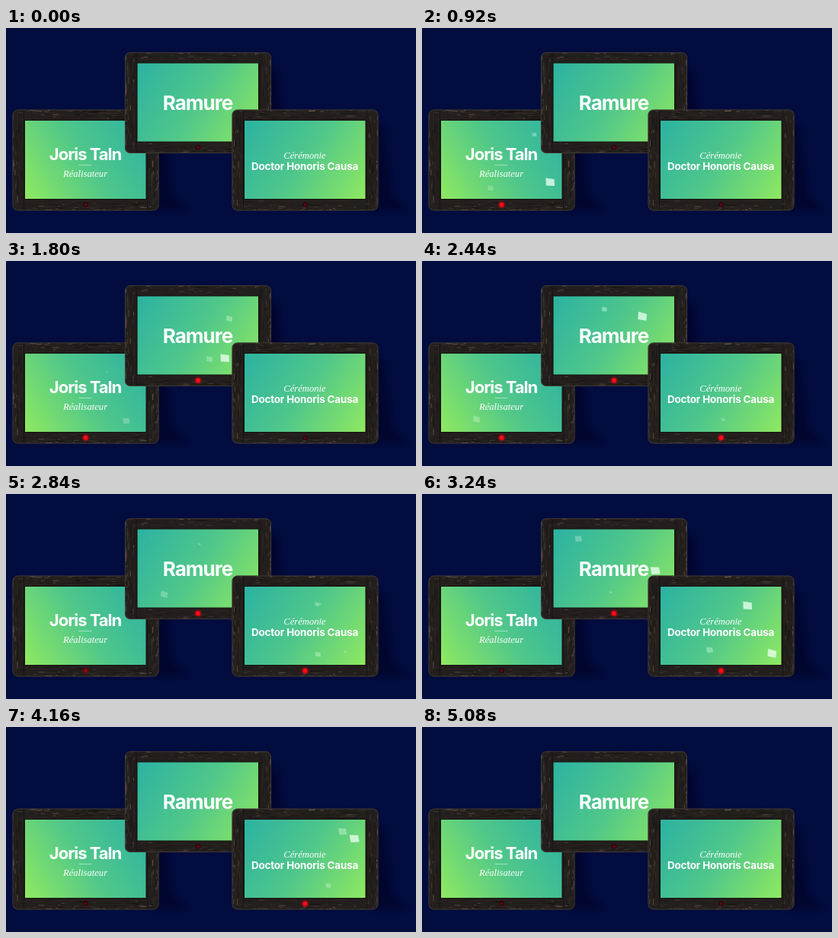
These frames come from a looping animation (538x270 px, 5360 ms). An HTML page:

```html
<!DOCTYPE html>
<html lang="fr">
<head>
<meta charset="utf-8">
<title>Trois écrans</title>
<style>
html, body { margin: 0; width: 100%; height: 100%; overflow: hidden; background: #020c3e; }
#stage { display: block; width: 538px; height: 270px; }
text { fill: #fff; text-anchor: middle; }
.bold { font-family: Inter, "Liberation Sans", sans-serif; font-weight: 700; }
.name { font-size: 22px; letter-spacing: -1px; }
.title { font-size: 26px; letter-spacing: -1px; }
.event { font-size: 13.4px; letter-spacing: -.15px; }
.italic { font-family: "Liberation Serif", serif; font-style: italic; font-size: 12.6px; }
</style>
</head>
<body>
<svg id="stage" viewBox="0 0 538 270"></svg>
<script>
const LOOP = 5360, RUN = 2800, FAINT = 7;
const BEFORE = 480, AFTER = 400;
const W = 192, H = 133;
const SCREEN = { x: 16, y: 14, width: 159.5, height: 104 };
const COLORS = ['#2bb2a2', '#50c78a', '#8fe960'];

// lines: class, baseline, words; leads: time and place of the bright scraps
const tablets = [
  {
    x: 8.5, y: 107.5, on: 80, flip: true, rule: 73,
    lines: [['bold name', 66, 'Joris Taln'], ['italic', 88.5, 'Réalisateur']],
    leads: [[920, 168, 203]]
  },
  {
    x: 156, y: 32, on: 1160,
    lines: [['bold title', 75.5, 'Ramure']],
    leads: [[1800, 287, 128], [2440, 289, 73], [3240, 306, 101]]
  },
  {
    x: 296.5, y: 107.5, on: 2240,
    lines: [['italic', 64, 'Cérémonie'], ['bold event', 79.5, 'Doctor Honoris Causa']],
    leads: [[3240, 427, 147], [3240, 459, 210], [4160, 457, 147]]
  }
];

function add(parent, tag, attrs, content) {
  const node = document.createElementNS('http://www.w3.org/2000/svg', tag);
  for (const key in attrs) node.setAttribute(key, attrs[key]);
  if (content) node.textContent = content;
  parent.appendChild(node);
  return node;
}

let seed = 7;
function rand(lo, hi) {
  seed = (seed * 16807) % 2147483647;
  return lo + (hi - lo) * seed / 2147483647;
}

function gradient(id, tag, stops, attrs) {
  const g = add(defs, tag, { id, ...attrs });
  stops.forEach((c, i) => add(g, 'stop', { offset: i / (stops.length - 1), 'stop-color': c }));
}

// Diagonal sweep from one corner to the opposite one, with square-on bands
function sweep(id, box, flip) {
  const dx = .84, dy = flip ? -.54 : .54;
  const half = (box.width * dx + box.height * .54) / 2;
  const cx = box.x + box.width / 2, cy = box.y + box.height / 2;
  gradient(id, 'linearGradient', flip ? [...COLORS].reverse() : COLORS, {
    gradientUnits: 'userSpaceOnUse',
    x1: cx - dx * half, y1: cy - dy * half, x2: cx + dx * half, y2: cy + dy * half
  });
}

// Scratches along the four boards; the pale ones gather at the outer edge
function grain(g, x, y) {
  for (let i = 0; i < 300; i++) {
    const upright = rand(0, 1) < .5, far = rand(0, 1) < .45, pale = rand(0, 1) < .3;
    const len = rand(2, pale ? 9 : 24);
    const across = 1 + 12 * rand(0, 1) ** (pale ? 3 : 1);
    const along = rand(4, (upright ? H : W) - len - 4);
    const px = upright ? (far ? W - across : across) : along;
    const py = upright ? along : (far ? H - across : across);
    add(g, 'path', {
      d: `M${x + px} ${y + py}${upright ? 'v' : 'h'}${len}`,
      stroke: pale ? '#8b7462' : i % 2 ? '#3a322d' : '#100e0e',
      'stroke-width': rand(.4, 1), opacity: rand(.25, .7)
    });
  }
}

// Faint scraps drift above and below the words, one after another
function scraps(t, box) {
  const bits = t.leads.map(([at, x, y]) => ({ at, x, y, size: 13, alpha: .78 }));
  for (let i = 0; i < FAINT; i++) {
    bits.push({
      at: t.on + BEFORE + (RUN - BEFORE - AFTER) * i / (FAINT - 1),
      x: box.x + rand(.2, .85) * box.width,
      y: box.y + (i % 2 ? rand(.12, .3) : rand(.78, .88)) * box.height,
      size: rand(5, 13), alpha: rand(.25, .42)
    });
  }
  return bits;
}

function build(t, n) {
  const { x, y } = t, mid = x + W / 2;
  const box = { ...SCREEN, x: x + SCREEN.x, y: y + SCREEN.y };
  sweep('screen' + n, box, t.flip);

  add(stage, 'path', {
    d: `M${x + W - 6} ${y + 14}l14 12l10 ${H - 46}l20 19h-50z`,
    fill: '#00031c', opacity: .45, filter: 'url(#soft)'
  });

  const g = add(stage, 'g', {});
  add(g, 'rect', { x, y, width: W, height: H, rx: 7, fill: '#231f1d' });
  grain(g, x, y);
  add(g, 'rect', { x: x + .4, y: y + .4, width: W - .8, height: H - .8, rx: 7, fill: 'none', stroke: '#5b4f47', 'stroke-width': .8, opacity: .7 });
  add(g, 'path', { d: `M${x + 15} ${y + 1}v${H - 2}M${x + W - 15} ${y + 1}v${H - 2}`, stroke: '#0f0c0b', opacity: .6 });
  add(g, 'rect', { ...box, fill: `url(#screen${n})`, stroke: '#15120f', 'stroke-width': 1 });

  const view = add(g, 'svg', { ...box, viewBox: `${box.x} ${box.y} ${box.width} ${box.height}` });
  t.bits = scraps(t, box);
  for (const bit of t.bits)
    bit.node = add(view, 'path', { d: 'M-.48 -.38L.4 -.34L.5 .34L-.36 .38z', fill: '#eafff0' });

  for (const [cls, base, words] of t.lines)
    add(g, 'text', { class: cls, x: mid - .5, y: y + base }, words);
  if (t.rule) add(g, 'path', { d: `M${mid - 9} ${y + t.rule}h17`, stroke: '#fff', 'stroke-width': .8, opacity: .6 });

  const led = { cx: mid, cy: y + 125.3 };
  add(g, 'circle', { ...led, r: 2.8, fill: '#5c0812', stroke: '#1b0607' });
  t.led = add(g, 'g', {});
  add(t.led, 'circle', { ...led, r: 5.8, fill: 'url(#glow)' });
  add(t.led, 'circle', { ...led, r: 3, fill: '#ff0a18' });
}

const clamp = v => Math.max(0, Math.min(1, v));
const envelope = (now, start, end, ramp) => clamp(Math.min(now - start, end - now) / ramp);

function draw(now) {
  for (const t of tablets) {
    t.led.setAttribute('opacity', envelope(now, t.on, t.on + RUN, 120));
    t.bits.forEach(({ node, at, x, y, size, alpha }, i) => {
      const dt = (now - at) / 1000;
      const e = envelope(now, at - BEFORE, at + AFTER, 300);
      const turn = 6 + 9 * Math.sin(i * 2.1 + dt * 2);
      node.setAttribute('opacity', alpha * e);
      node.setAttribute('transform',
        `translate(${x + 36 * dt} ${y + 6 * dt}) rotate(${turn}) scale(${size * e})`);
    });
  }
}

const defs = add(stage, 'defs', {});
const soft = add(defs, 'filter', { id: 'soft', x: '-50%', y: '-20%', width: '200%', height: '140%' });
add(soft, 'feGaussianBlur', { stdDeviation: 3 });
gradient('glow', 'radialGradient', ['#ff0010', '#ff001000']);
add(stage, 'rect', { width: 538, height: 270, fill: '#020c3e' });
tablets.forEach(build);

const begin = performance.now();
function tick() {
  draw((performance.now() - begin) % LOOP);
  requestAnimationFrame(tick);
}
tick();
</script>
</body>
</html>
```
